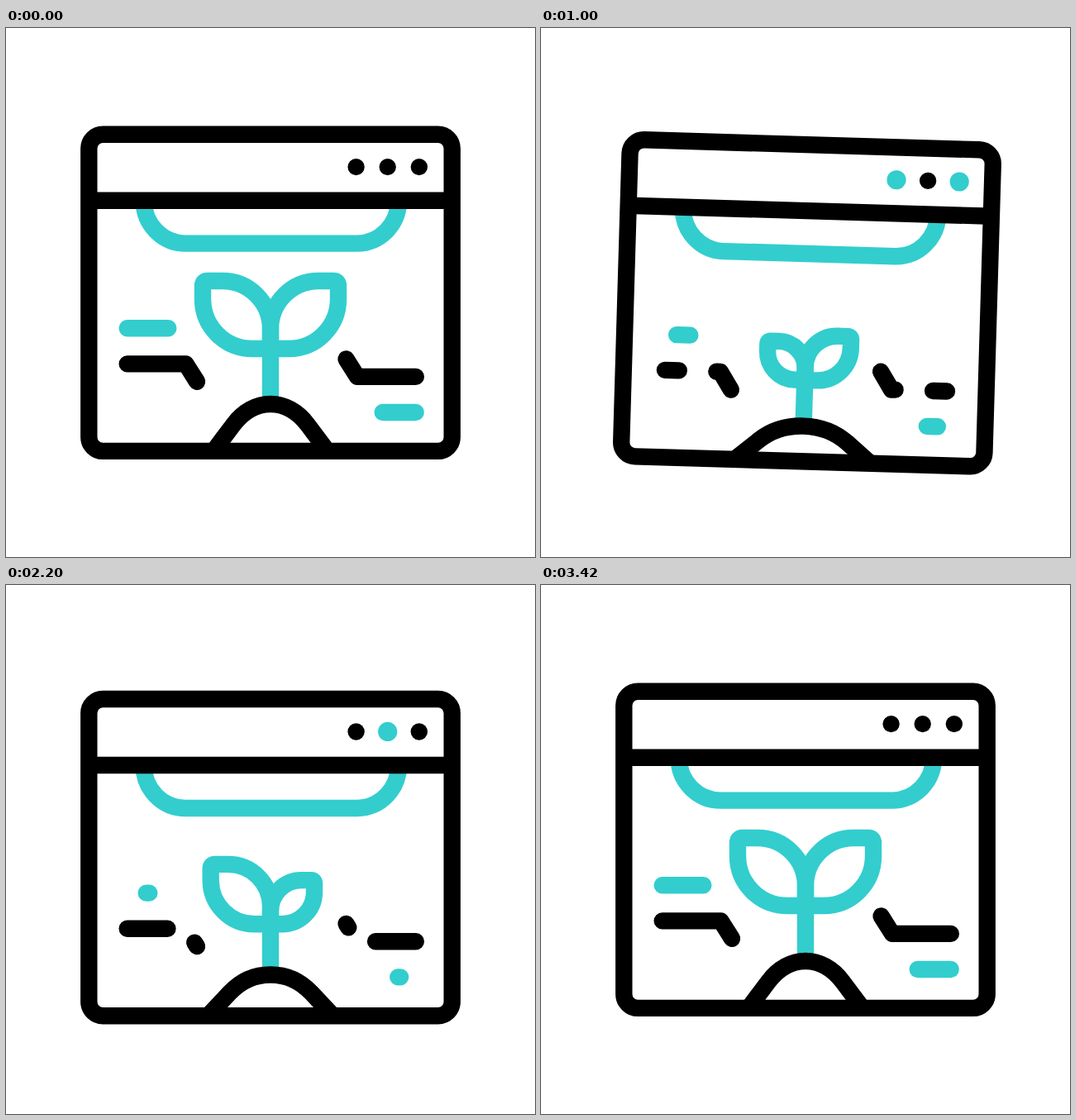
An HTML page for the animation above (3.6 s loop, 640 by 640 pixels).

```html
<!DOCTYPE html>
<html lang="en">
<head>
<meta charset="utf-8">
<title>Growing page</title>
<style>
  html, body { margin: 0; width: 100%; height: 100%; overflow: hidden; background: #fff; }
  svg { display: block; width: 640px; height: 640px; }
  .ink, .teal { fill: none; stroke-width: 20.4; stroke-linejoin: round; }
  .ink { stroke: #000; }
  .teal { stroke: #33cdce; }
  .round { stroke-linecap: round; }
  .leaf { vector-effect: non-scaling-stroke; }
</style>
</head>
<body>
<svg viewBox="0 0 640 640">
  <g id="win">
    <path class="teal" d="M166.7 209A50.5 51.5 0 0 0 217 260.6H425A50.5 51.5 0 0 0 475 209"/>
    <g id="dashes" class="teal round"></g>
    <g id="lines" class="ink round"></g>
    <g id="sprout" class="teal">
      <path id="stem"/>
    </g>
    <path id="mound" class="ink"/>
    <rect class="ink" x="100.3" y="128.7" width="439.4" height="383.2" rx="17"/>
    <path class="ink" d="M100 208.7H540"/>
    <g id="dots"></g>
  </g>
</svg>
<script>
const LOOP = 3600;
const LEN = 96;
const $ = id => document.getElementById(id);
const sine = u => (1 - Math.cos(Math.PI * u)) / 2;
const clamp = (v, max) => Math.min(max, Math.max(0, v));

function set(el, attrs) {
  for (const name in attrs) el.setAttribute(name, attrs[name]);
}
function add(parent, tag, attrs) {
  const el = document.createElementNS('http://www.w3.org/2000/svg', tag);
  set(el, attrs);
  return parent.appendChild(el);
}

// Sine-eased path through a few [time, value] turning points, flat outside them.
const through = (...keys) => t => keys.slice(1).reduce((v, [t1, b], i) => {
  const [t0, a] = keys[i];
  return v + (b - a) * sine(clamp((t - t0) / (t1 - t0), 1));
}, keys[0][1]);

// Falls to 1, waits, springs back a little past 0 and settles.
const dip = (start, low, rise, top, end, over) =>
  through([start, 0], [low, 1], [rise, 1], [top, -over], [end, 0]);

const tilt = through([0, 0], [510, -6.2], [1130, 2.6], [1480, -2.9], [1900, 0]);
const bob = through([0, 0], [760, 19.5], [1620, -19], [2085, 16], [2450, -13], [3060, 0]);
const sway = t => 2 * Math.sin(Math.PI * clamp(t / 2200, 1));
const pulse = t => .535 + .465 * Math.cos(2 * Math.PI * clamp(t / 1480, 2));
const wilt = dip(100, 1200, 1780, 2500, 2960, .19);
const ground = dip(0, 1180, 1750, 2700, 3200, .14);

// Ends of the strokes that run along each bent line at a steady speed.
const edge = (start, speed) => t => clamp((t - start) * speed, LEN);
const runs = [
  [edge(205, .083), () => LEN],
  [edge(950, .0725), edge(752, .0826)],
  [() => 0, edge(1585, .079)]
];

const strokes = [0, 180].flatMap(turn => runs.map(([tail, head]) => ({
  tail, head,
  el: add($('lines'), 'path', {
    d: 'M146.7 406.4H217.5L231 427.8',
    pathLength: LEN,
    transform: `rotate(${turn} 321.25 414.15)`
  })
})));

const dashes = [[171.5, 363.3, 24.8], [475.7, 465, 20]].map(([x, y, half]) =>
  ({ x, half, el: add($('dashes'), 'line', { y1: y, y2: y }) }));

const leaves = [1, -1].map(() => add($('sprout'), 'path', {
  class: 'leaf',
  d: 'M0 0H-22A60 60 0 0 1 -82 -60V-76Q-82 -82 -76 -82H-58A58 58 0 0 1 0 -24Z'
}));

const dots = [0, 1, 2].map(i => add($('dots'), 'circle', { cx: 423.6 + 38.1 * i, cy: 168.1 }));

function drawWindow(t) {
  set($('win'), { transform: `translate(${sway(t)} ${bob(t)}) rotate(${tilt(t)} 320 320.3)` });
}

// The dots light up in turn, three times each.
function drawDots(t) {
  const step = Math.floor((t - 250) / 360);
  dots.forEach((el, i) => {
    const turn = step - i;
    const lit = turn >= 0 && turn <= 4 && turn % 2 === 0;
    set(el, { r: lit ? 11.6 : 10.2, fill: lit ? '#33cdce' : '#000' });
  });
}

function drawLines(t) {
  const k = pulse(t);
  for (const { x, half, el } of dashes) set(el, { x1: x - half * k, x2: x + half * k });
  for (const { tail, head, el } of strokes) {
    const from = tail(t), size = head(t) - from;
    el.style.display = size > 0 ? '' : 'none';
    set(el, { 'stroke-dasharray': `${Math.max(0, size)} 300`, 'stroke-dashoffset': -from });
  }
}

function drawSprout(t) {
  const g = ground(t);
  const base = 388 + 27 * g;
  const drop = 15 * g;

  leaves.forEach((el, i) => {
    const s = 1 - .475 * wilt(t - 200 * i);
    set(el, { transform: `translate(320 ${base}) scale(${i ? -s : s} ${s})` });
  });
  set($('stem'), { d: `M320 ${base}V${456 + drop}` });

  const sx = 1 + drop * .0136, sy = 1 - drop / 57;
  const p = (x, y) => `${320 + x * sx} ${512 - y * sy}`;
  set($('mound'), {
    d: `M${p(-69, 0)}L${p(-45, 32)}C${p(-33, 48)} ${p(-17, 57)} ${p(0, 57)}` +
       `S${p(33, 48)} ${p(45, 32)}L${p(69, 0)}`
  });
}

const start = performance.now();
function tick() {
  const t = (performance.now() - start) % LOOP;
  drawWindow(t);
  drawDots(t);
  drawLines(t);
  drawSprout(t);
  requestAnimationFrame(tick);
}
tick();
</script>
</body>
</html>
```
